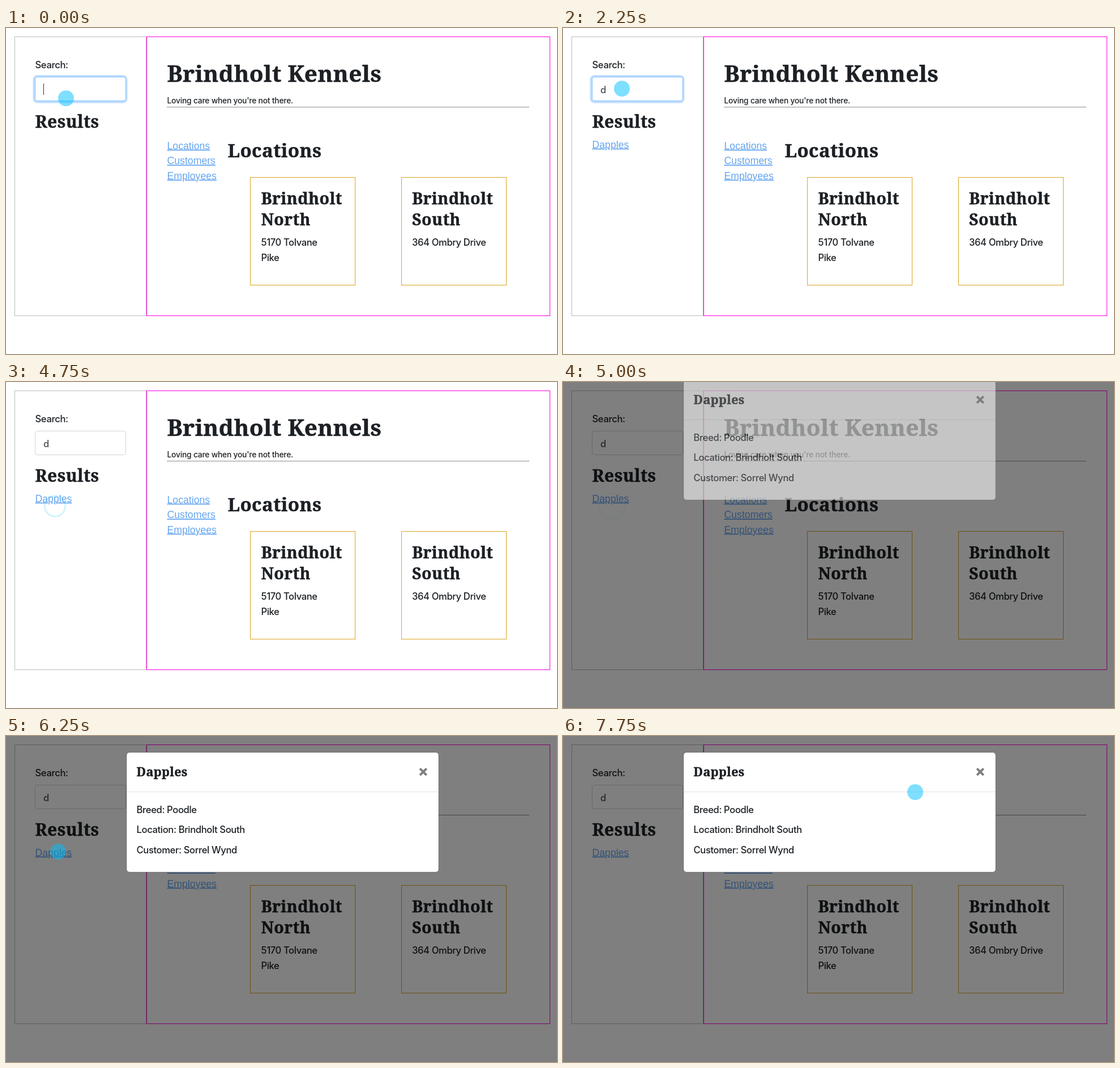
An HTML page that plays this animation: 973 px wide and 575 px high, repeating every 8 s.

```html
<!DOCTYPE html>
<html lang="en">
<head>
<meta charset="utf-8">
<title>Kennel search</title>
<style>
  html, body { margin: 0; width: 100%; height: 100%; overflow: hidden; background: #fff; }
  svg { display: block; width: 973px; height: 575px; }
  text { font: 450 16.6px Inter, sans-serif; letter-spacing: -.37px; fill: #1c2024; white-space: pre; }
  .head { font-family: "Noto Serif", serif; font-weight: 800; letter-spacing: .4px; stroke: #1c2024; stroke-width: .5px; }
  .link { font: 17.68px "Liberation Sans", Arial, sans-serif; letter-spacing: 0; fill: #66a6f0; text-decoration: underline; }
  .title { font-size: 40.5px; }
  .section { font-size: 33px; }
  .results { font-size: 30px; }
  .card { font-size: 28.5px; }
  .name { font-size: 21.5px; }
  .small { font-size: 13.8px; letter-spacing: -.2px; }
  .typed { fill: #495057; }
  .close { font-size: 27px; font-weight: 800; fill: #7f7f7f; }
  .outline { fill: none; shape-rendering: crispEdges; }
</style>
</head>
<body>
<svg viewBox="0 0 973 575">
  <path class="outline" d="M15 15.5H248M15 507.5H248M15.5 15V508M247.5 15V508" stroke="#777" stroke-dasharray="1 1"/>
  <rect class="outline" x="248.5" y="15.5" width="712" height="492" stroke="#f0d"/>
  <text x="51.5" y="70.5">Search:</text>
  <rect id="glow" x="49.5" y="85" width="163" height="45.5" rx="6" fill="none" stroke="#bfdeff" stroke-width="4"/>
  <rect id="field" x="51.5" y="86.5" width="160" height="42" rx="4" fill="#fff"/>
  <text id="typed" class="typed" x="66" y="114.5">d</text>
  <path id="caret" class="outline" d="M.5 98V118" stroke="#333"/>
  <text class="head results" x="51.5" y="176">Results</text>
  <text id="result" class="link" x="51.5" y="211.5">Dapples</text>

  <text class="head title" x="284.5" y="94.5">Brindholt Kennels</text>
  <text class="small" x="284.5" y="132.5">Loving care when you're not there.</text>
  <path class="outline" d="M284 139.5H924" stroke="#8c8c8c"/>
  <text class="link" x="284.5" y="213.5">Locations</text>
  <text class="link" x="284.5" y="240">Customers</text>
  <text class="link" x="284.5" y="266.5">Employees</text>
  <text class="head section" x="391.5" y="228">Locations</text>

  <rect class="outline" x="431.5" y="263.5" width="185" height="190" stroke="#daa520"/>
  <text class="head card" x="450.5" y="311">Brindholt</text>
  <text class="head card" x="450.5" y="348">North</text>
  <text x="450.5" y="384">5170 Tolvane</text>
  <text x="450.5" y="410.5">Pike</text>
  <rect class="outline" x="698.5" y="263.5" width="185" height="190" stroke="#daa520"/>
  <text class="head card" x="717" y="311">Brindholt</text>
  <text class="head card" x="717" y="348">South</text>
  <text x="717" y="384">364 Ombry Drive</text>

  <circle id="ring" cx="86.5" cy="219" fill="none" stroke="#00bfff" stroke-width="2.6"/>
  <rect id="backdrop" width="973" height="575" fill="#000" opacity=".5"/>
  <g id="modal">
    <rect x="213" y="29" width="551" height="211" rx="5" fill="#fff" stroke="#000" stroke-opacity=".25"/>
    <path class="outline" d="M213 98.5H764" stroke="#dee2e6"/>
    <text class="head name" x="230.5" y="70.5">Dapples</text>
    <text class="close" x="736.5" y="71" text-anchor="middle">×</text>
    <text x="230.5" y="136">Breed: Poodle</text>
    <text x="230.5" y="171">Location: Brindholt South</text>
    <text x="230.5" y="206.5">Customer: Sorrel Wynd</text>
  </g>
  <circle id="pointer" r="14" fill="#00bfff" fill-opacity=".5"/>
</svg>
<script>
const LOOP = 8000, STEP = 250;
const el = id => document.getElementById(id);
const show = (id, on) => el(id).setAttribute("visibility", on ? "visible" : "hidden");
const set = (id, attrs) => {
  for (const key in attrs) el(id).setAttribute(key, attrs[key]);
};

// Pointer keys: time, x, y
const path = [
  [0, 106, 124], [250, 104, 107], [2250, 104, 107], [2750, 97, 133], [3250, 94.5, 186],
  [3750, 86, 205], [6000, 86, 205], [6250, 92, 204], [6500, 145, 194],
  [7250, 442, 136], [7750, 622, 99], [8000, 622, 99]
];
const caretSpans = [[0, 250], [750, 1250], [1500, 2250], [2750, 3250], [3500, 4250]];

function pointerAt(t) {
  const next = Math.max(1, path.findIndex(key => key[0] > t));
  const [t0, x0, y0] = path[next - 1], [t1, x1, y1] = path[next];
  const p = (t - t0) / (t1 - t0);
  return { cx: x0 + (x1 - x0) * p, cy: y0 + (y1 - y0) * p };
}

function draw(now) {
  const t = Math.floor(now % LOOP / STEP) * STEP;
  const typed = t >= 1000, focused = t < 4500, open = t >= 5000;
  const clicking = t >= 4500 && t < 5250;
  const opening = t === 5000;

  show("typed", typed);
  show("result", t >= 1250);
  show("glow", focused);
  set("field", { stroke: focused ? "#80bdff" : "#ced4da" });
  show("caret", caretSpans.some(([from, to]) => t >= from && t < to));
  set("caret", { transform: `translate(${typed ? 77 : 66})` });

  show("pointer", !clicking);
  set("pointer", pointerAt(t));
  show("ring", clicking);
  set("ring", { r: 14 + (t - 4500) / 60, opacity: Math.max(.05, .4 - (t - 4500) / 1250) });

  show("backdrop", open);
  show("modal", open);
  set("modal", { opacity: opening ? .55 : 1, transform: `translate(0 ${opening ? -32 : 0})` });
  requestAnimationFrame(draw);
}
draw(performance.now());
</script>
</body>
</html>
```
